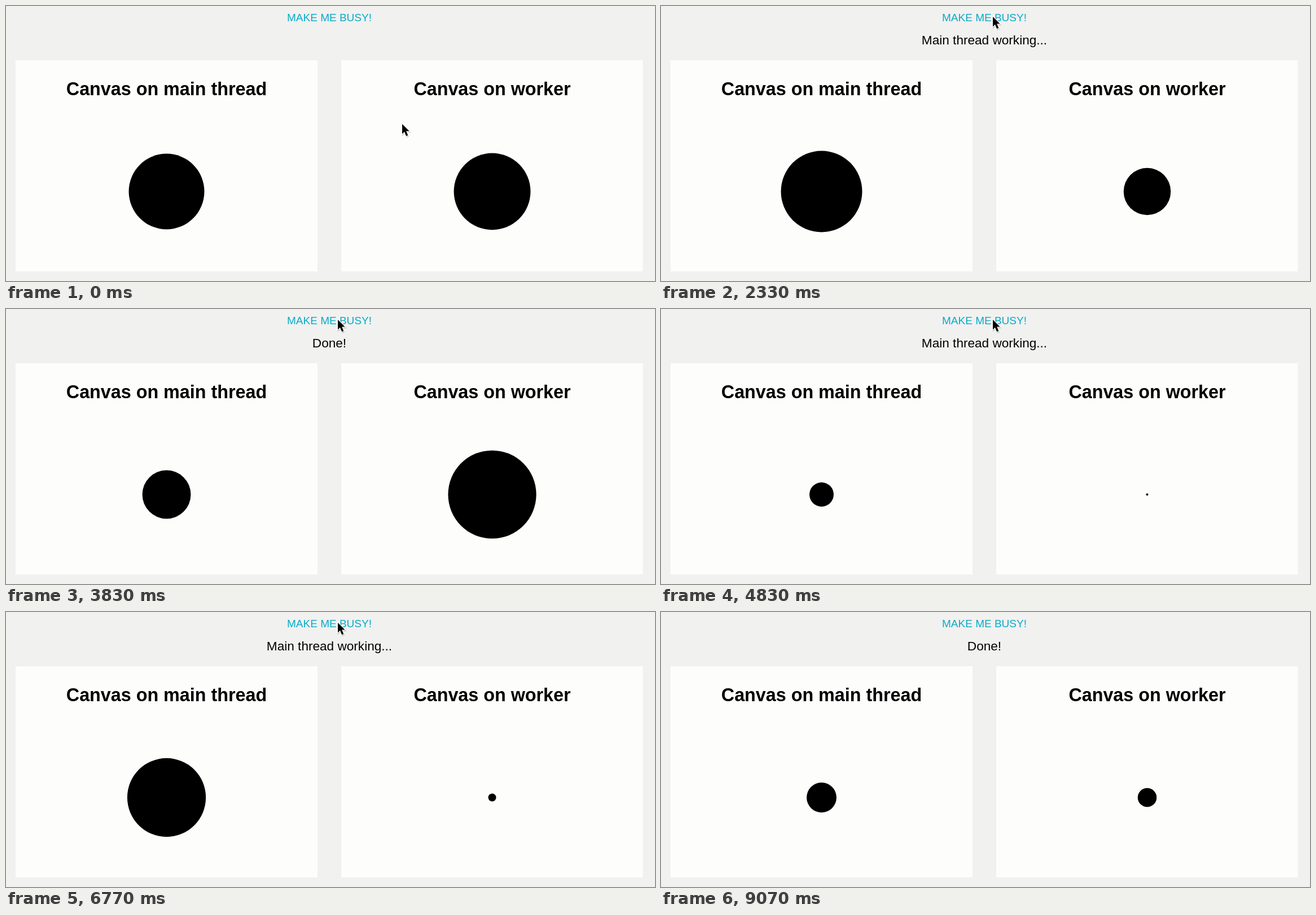
Recreate the animation shown at these times as an HTML page. Size 1150 px wide and 487 px high, loop 9.11 s.

```html
<!DOCTYPE html>
<html lang="en">
<head>
<meta charset="utf-8">
<title>Canvas on main thread and worker</title>
<style>
  html, body { margin: 0; width: 100%; height: 100%; overflow: hidden; background: #f1f1f0; }
  svg { display: block; width: 1150px; height: 487px; }
  text { font-family: "Liberation Sans", Arial, sans-serif; text-anchor: middle; }
  .button { font-size: 19px; fill: #06abc8; }
  .status { font-size: 22.6px; }
  .title { font-size: 32.3px; font-weight: 700; }
  .card { fill: #fdfdfc; }
</style>
</head>
<body>
<svg viewBox="0 0 1150 487">
  <rect class="card" x="17" y="96" width="535" height="374"/>
  <rect class="card" x="594" y="96" width="534.5" height="374"/>
  <text class="button" x="573" y="27">MAKE ME BUSY!</text>
  <text class="status" id="status" x="573" y="68"></text>
  <text class="title" x="284.5" y="157.5">Canvas on main thread</text>
  <text class="title" x="861.5" y="157.5">Canvas on worker</text>
  <circle id="main" cx="284.5" cy="328.5"/>
  <circle id="worker" cx="861.5" cy="328.5"/>
  <g id="cursor">
    <path d="M0 0V17.6L4 13.8L7.1 21.2L10.3 19.9L7.2 12.6H12.6Z" transform="translate(.8 1.6)"
      fill="#000" opacity=".18" stroke="#000" stroke-width="2"/>
    <path d="M0 0V17.6L4 13.8L7.1 21.2L10.3 19.9L7.2 12.6H12.6Z"
      stroke="#fff" stroke-width="2.2" paint-order="stroke" stroke-linejoin="round"/>
  </g>
</svg>
<script>
  const LOOP = 9110;
  const MAX = 80;          // largest radius
  const SPEED = 0.0799;    // radius change per ms
  const START = 92;        // radius path already covered: 68, shrinking
  const busy = [[1740, 3267], [4100, 5600], [6740, 8271]];   // main thread blocked
  const path = [           // time, x, y of the pointer
    [0, 702, 209], [250, 702, 209], [1150, 606, 18], [1330, 604, 17],
    [1550, 588, 19], [8450, 588, 19], [8800, 575, -30], [LOOP, 575, -30]
  ];
  const el = id => document.getElementById(id);
  const status = el('status'), main = el('main'), worker = el('worker'), cursor = el('cursor');

  function radius(run) {
    const d = (START + SPEED * run) % (2 * MAX);
    return d < MAX ? d : 2 * MAX - d;
  }

  function setRadius(circle, r) {
    circle.setAttribute('r', r < 0.8 ? 0 : r);
  }

  function blockedTime(t) {
    return busy.reduce((sum, [a, b]) => sum + Math.max(0, Math.min(t, b) - a), 0);
  }

  function statusAt(t) {
    if (t < busy[0][0]) return '';
    return busy.some(([a, b]) => t >= a && t < b) ? 'Main thread working...' : 'Done!';
  }

  function pointer(t) {
    const i = path.findIndex(p => p[0] > t);
    const [t0, x0, y0] = path[i - 1], [t1, x1, y1] = path[i];
    const k = (t - t0) / (t1 - t0), e = k * k * (3 - 2 * k);
    return [x0 + (x1 - x0) * e, y0 + (y1 - y0) * e];
  }

  function draw(t) {
    // START counts along a grow-then-shrink path: 80 up, then 12 down
    setRadius(worker, radius(t));
    setRadius(main, radius(t + 12 - blockedTime(t)));
    const text = statusAt(t);
    if (status.textContent !== text) status.textContent = text;
    cursor.setAttribute('transform', `translate(${pointer(t)})`);
  }

  const begin = performance.now();
  function frame() {
    draw((performance.now() - begin) % LOOP);
    requestAnimationFrame(frame);
  }
  draw(0);
  requestAnimationFrame(frame);
</script>
</body>
</html>
```
